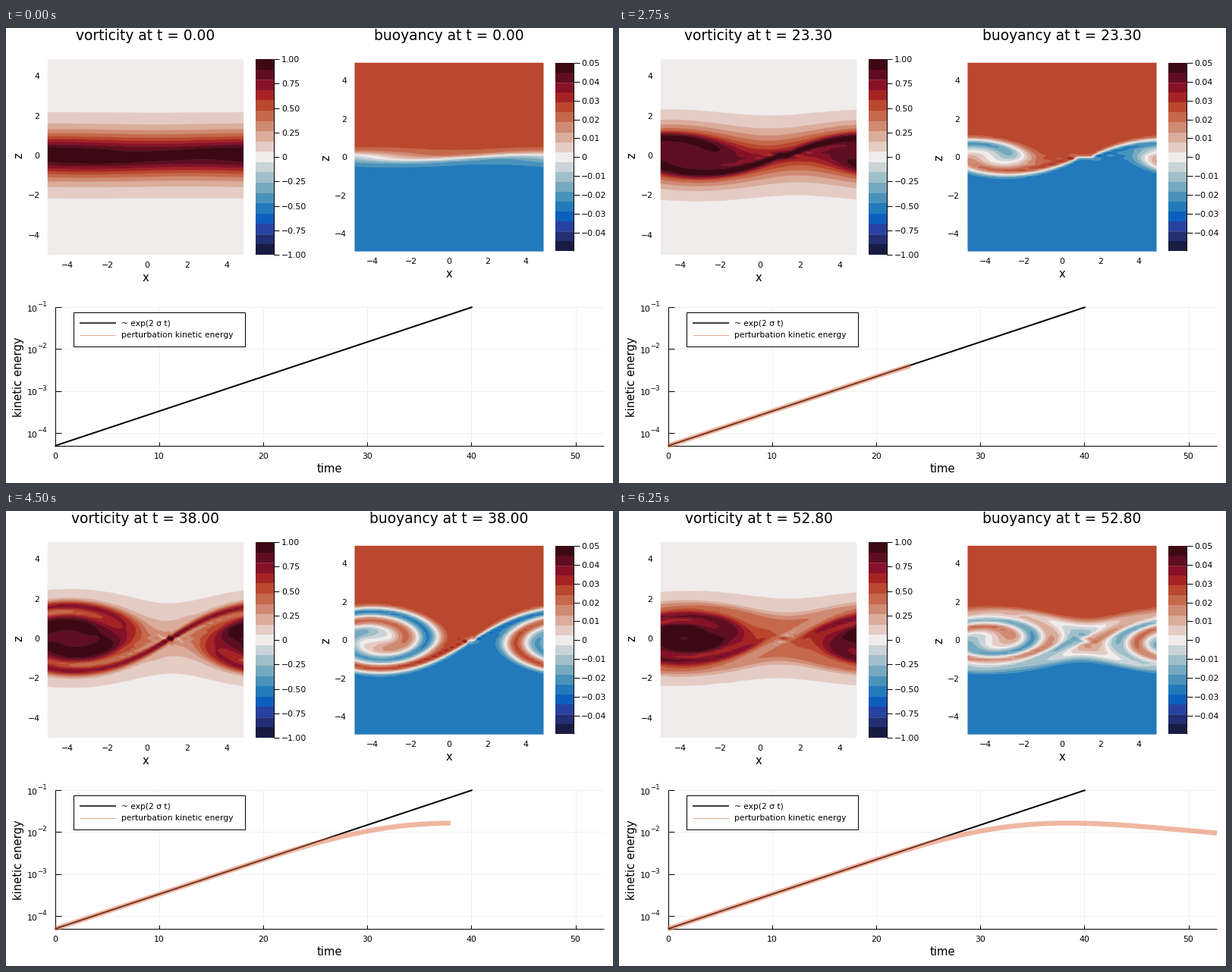
Write a matplotlib script that moves like this. It is 800x600 px and loops after 6370 ms.

```python
import numpy as np
import matplotlib.pyplot as plt
from matplotlib.animation import FuncAnimation
from matplotlib.patches import Rectangle

plt.rcParams["font.family"] = "DejaVu Sans"

# ---------- stratified shear layer on a staggered grid ----------
N, L = 64, 10.0
D = L / N
DT, NU, RI, H = 0.1, 2e-4, 0.1, 0.25
E0, CORE_X = 5e-5, -3.82

xf = -L / 2 + D * np.arange(N)
xc = xf + D / 2
zf = xf[1:]
zc = xc
U = np.repeat(np.tanh(zc)[:, None], N, axis=1)
OMEGA = np.diff(U, axis=0) / D
B = np.repeat(H * RI * np.tanh(zc / H)[:, None], N, axis=1)

m = np.arange(1, N)
SINE = np.sqrt(2 / N) * np.sin(np.pi * np.outer(m, m) / N)
LAM = (2 * np.cos(np.pi * m / N)[:, None] - 4
       + 2 * np.cos(2 * np.pi * np.arange(N // 2 + 1) / N)) / D ** 2


def left(a):
    """Fourth-order value midway to the left neighbour (periodic)."""
    p = np.pad(a, ((0, 0), (2, 1)), mode="wrap")
    return (7 * (p[:, 1:-2] + p[:, 2:-1]) - p[:, :-3] - p[:, 3:]) / 12


def mid(a):
    """Fourth-order value midway between rows."""
    p = np.pad(a, ((1, 1), (0, 0)), mode="edge")
    return (7 * (p[1:-2] + p[2:-1]) - p[:-3] - p[3:]) / 12


def slope_x(a):
    return (a - np.roll(a, 1, axis=1)) / D


def velocity(om):
    """Perturbation velocities from vorticity, with solid walls."""
    hat = np.fft.rfft(SINE @ (om - OMEGA), axis=1) / LAM
    psi = np.pad(SINE @ np.fft.irfft(hat, n=N, axis=1), ((1, 1), (0, 0)))
    return np.diff(psi, axis=0) / D, (psi - np.roll(psi, -1, axis=1)) / D


def kinetic_energy(om):
    u, w = velocity(om)
    return (np.mean(u ** 2) + np.mean(w[:-1] ** 2)) / 2


def flux(c, v, mode):
    """Fifth-order upwind flux along the first axis."""
    p = np.pad(c, ((3, 3), (0, 0)), mode=mode)
    a = [p[j:j + len(v)] for j in range(6)]
    even = 37 * (a[2] + a[3]) - 8 * (a[1] + a[4]) + a[0] + a[5]
    odd = 10 * (a[3] - a[2]) - 5 * (a[4] - a[1]) + a[5] - a[0]
    return (v * even - np.abs(v) * odd) / 60


def advect(c, u, w):
    fx = flux(c.T, u.T, "wrap").T
    fz = flux(c, w, "edge")
    return (fx - np.roll(fx, -1, axis=1) - np.diff(fz, axis=0)) / D


def laplace(c):
    p = np.pad(c, ((1, 1), (0, 0)), mode="edge")
    return (p[2:] + p[:-2] + np.roll(c, 1, 1) + np.roll(c, -1, 1) - 4 * c) / D ** 2


def tendency(om, b):
    """Curl of the momentum equation, and the buoyancy equation."""
    u, w = velocity(om)
    u = u + U
    d_u = advect(u, left(u), left(w))
    d_w = advect(w[1:-1], mid(u), mid(w)) + (b[1:] + b[:-1]) / 2
    d_om = np.diff(d_u, axis=0) / D - slope_x(d_w) + NU * laplace(om - OMEGA)
    return d_om, advect(b, u, w) + NU * laplace(b - B)


def step(om, b):
    """Three-stage Runge-Kutta step."""
    o, c = om, b
    for keep in (0.0, 0.75, 1 / 3):
        d_o, d_c = tendency(o, c)
        o = keep * om + (1 - keep) * (o + DT * d_o)
        c = keep * b + (1 - keep) * (c + DT * d_c)
    return o, c


def rescale(om, b, target):
    s = np.sqrt(target / kinetic_energy(om))
    return OMEGA + s * (om - OMEGA), B + s * (b - B)


def unstable_mode():
    """Fastest growing linear wave of the shear layer."""
    k = 2 * np.pi / L
    n = N - 1
    d2 = (np.eye(n, k=1) + np.eye(n, k=-1) - 2 * np.eye(n)) / D ** 2
    inv = np.linalg.inv(d2 - k ** 2 * np.eye(n))
    avg = (np.eye(n, N) + np.eye(n, N, k=1)) / 2
    bend = -2 * np.tanh(zf) / np.cosh(zf) ** 2
    strat = RI / np.cosh(zc / H) ** 2
    op = 1j * k * np.block([
        [bend[:, None] * inv - np.diag(np.tanh(zf)), -avg],
        [strat[:, None] * (avg.T @ inv), -np.diag(np.tanh(zc))]])
    val, vec = np.linalg.eig(op)
    v = vec[:, np.argmax(val.real)]
    centre = (inv @ v[:n])[n // 2]
    v = -v * np.exp(-1j * k * CORE_X) * abs(centre) / centre
    wave = lambda a, x: np.real(np.outer(a, np.exp(1j * k * x)))
    return OMEGA + wave(v[:n], xf), B + wave(v[n:], xc)


FRAMES = 51
STEPS = [int(round(10.55 * k + 0.45)) for k in range(FRAMES)]


def simulate():
    """Fields at the wanted steps, and the energy at every step."""
    om, b = unstable_mode()
    for _ in range(2):
        om, b = rescale(om, b, 1e-6)
        for _ in range(150):
            om, b = step(om, b)
    om, b = rescale(om, b, E0)
    wanted, saved, energy = set(STEPS), [], []
    wall = np.full((1, N), np.cosh(L / 2) ** -2)
    for i in range(STEPS[-1] + 1):
        if i in wanted:
            saved.append((np.vstack([wall, om]), b))
        energy.append(kinetic_energy(om))
        om, b = step(om, b)
    return saved, np.array(energy)


states, energy = simulate()

# ---------- stage in pixel coordinates ----------
fig = plt.figure(figsize=(8, 6), dpi=100, facecolor="white")
ax = fig.add_axes([0, 0, 1, 1])
ax.set_xlim(0, 800)
ax.set_ylim(600, 0)
ax.axis("off")

PT = 0.72
TITLE, GUIDE, TICK, LEGEND = 18.7, 14.8, 10.9, 10.65
BANDS = np.array([
    (24, 28, 67), (35, 47, 114), (40, 66, 162), (13, 95, 189), (34, 122, 186),
    (73, 146, 186), (118, 169, 191), (161, 191, 201), (202, 212, 216),
    (240, 236, 235), (228, 204, 197), (218, 172, 156), (207, 138, 115),
    (197, 104, 76), (186, 72, 46), (166, 35, 36), (134, 17, 40),
    (95, 13, 32), (60, 9, 18)]) / 255
PINK = "#e26f46"


def text(x, y, s, size, ha="center", **kw):
    kw.setdefault("va", "baseline")
    return ax.text(x, y, s, fontsize=size * PT, ha=ha, color="black", zorder=8, **kw)


def line(xs, ys, width=1.0, color="black", **kw):
    kw.setdefault("solid_capstyle", "butt")
    return ax.plot(xs, ys, color=color, lw=width * PT, **kw)[0]


def number(v, fmt):
    return "0" if abs(v) < 1e-9 else fmt.format(v).replace("-", "\u2212")


class Panel:
    """Filled contour map with its tick labels and colour scale."""

    def __init__(self, name, scale, origin, grid, limit, ticks):
        self.name, self.art = name, None
        ox, oy = origin
        self.x, self.y = ox + scale * grid, oy - scale * grid
        x0, y0 = self.x[0], self.y[-1]
        size = scale * (grid[-1] - grid[0])
        bottom, middle = y0 + size, x0 + size / 2
        self.levels = np.linspace(-limit, limit, 20)
        self.levels[[0, -1]] = -9, 9
        self.title = text(middle, 16.5, "", TITLE)
        for v in range(-4, 5, 2):
            label = number(v, "{:d}")
            text(ox + scale * v, bottom + 17, label, TICK)
            text(x0 - 10.5, oy - scale * v + 4, label, TICK, ha="right")
        text(middle, bottom + 34.5, "x", GUIDE)
        text(x0 - 38, oy + 0.5, "z", GUIDE, rotation=90, va="center")
        self.scale_bar(x0 + size + 16, y0, size, limit, ticks)

    def scale_bar(self, x, y, size, limit, ticks):
        h = size / 19
        for i, c in enumerate(BANDS[::-1]):
            ax.add_patch(Rectangle((x, y + i * h), 24, h, fc=c, ec="none"))
        for i in (2, 17):
            line([x, x + 24], [y + i * h] * 2, 0.8, "white", ls=":", alpha=0.45)
        line([x + 24.3] * 2, [y, y + size])
        for v in ticks:
            ty = y + size / 2 * (1 - v / limit)
            line([x + 24, x + 31.5], [ty, ty])
            text(x + 34, ty + 4, number(v, "{:.2f}"), TICK, ha="left")

    def show(self, field, t):
        if self.art is not None:
            self.art.remove()
        self.art = ax.contourf(self.x, self.y, field, levels=self.levels,
                               colors=BANDS, antialiased=True, zorder=2)
        self.art.set_edgecolor("face")
        self.art.set_linewidth(0.35)
        self.title.set_text(f"{self.name} at t = {t:.2f}")


vorticity = Panel("vorticity", 26.2, (186, 168), xf, 1.0, np.arange(-4, 5) / 4)
buoyancy = Panel("buoyancy", 25.23, (584, 170.2), xc, 0.05, np.arange(-4, 6) / 100)

# ---------- energy chart ----------
LEFT, RIGHT, TOP, BOTTOM = 64.5, 788, 368, 551


def time_x(t):
    return LEFT + 13.72 * t


def log_y(v):
    return TOP - 55.43 * (v + 1)


for t in range(0, 51, 10):
    x = time_x(t)
    if t:
        line([x, x], [TOP, BOTTOM], 1, "#f1f1f1", zorder=1)
    line([x, x], [BOTTOM - 5, BOTTOM], zorder=3)
    text(x, 567.5, str(t), TICK)
for p in range(-4, 0):
    y = log_y(p)
    line([LEFT, RIGHT], [y, y], 1, "#f1f1f1", zorder=1)
    line([LEFT, LEFT + 8], [y, y], zorder=3)
    text(41.5, y + 5.5, "10", TICK, ha="right")
    text(41.5, y - 1, f"\u2212{-p}", 8.6, ha="left")
line([LEFT + 0.7] * 2, [TOP, BOTTOM + 0.5], zorder=3)
line([LEFT, RIGHT], [BOTTOM, BOTTOM], zorder=3)
text(426, 586, "time", GUIDE)
text(16.7, 460, "kinetic energy", GUIDE, rotation=90, va="center")

line([time_x(0), time_x(40.1)], [log_y(np.log10(E0)), log_y(-1)], 2, zorder=4)
curve_x = np.minimum(time_x(DT * np.arange(len(energy))), RIGHT)
curve_y = log_y(np.log10(energy))
curve = line([], [], 6.5, PINK, alpha=0.5, zorder=5)

ax.add_patch(Rectangle((88.5, 374.5), 226, 45, fc="white", ec="black",
                       lw=PT, zorder=6))
line([97, 145], [389, 389], 1.5, zorder=7)
line([97, 145], [404.5, 404.5], 1, PINK, alpha=0.6, zorder=7)
text(152, 393, "~ exp(2 \u03c3 t)", LEGEND, ha="left")
text(152, 408.5, "perturbation kinetic energy", LEGEND, ha="left")


def draw(k):
    n = STEPS[k]
    om, b = states[k]
    vorticity.show(om, n * DT)
    buoyancy.show(b, n * DT)
    curve.set_data(curve_x[:n + 1], curve_y[:n + 1])
    return []


anim = FuncAnimation(fig, draw, frames=FRAMES, interval=6370 / FRAMES,
                     repeat=True, repeat_delay=0, blit=False)
plt.show()
```
